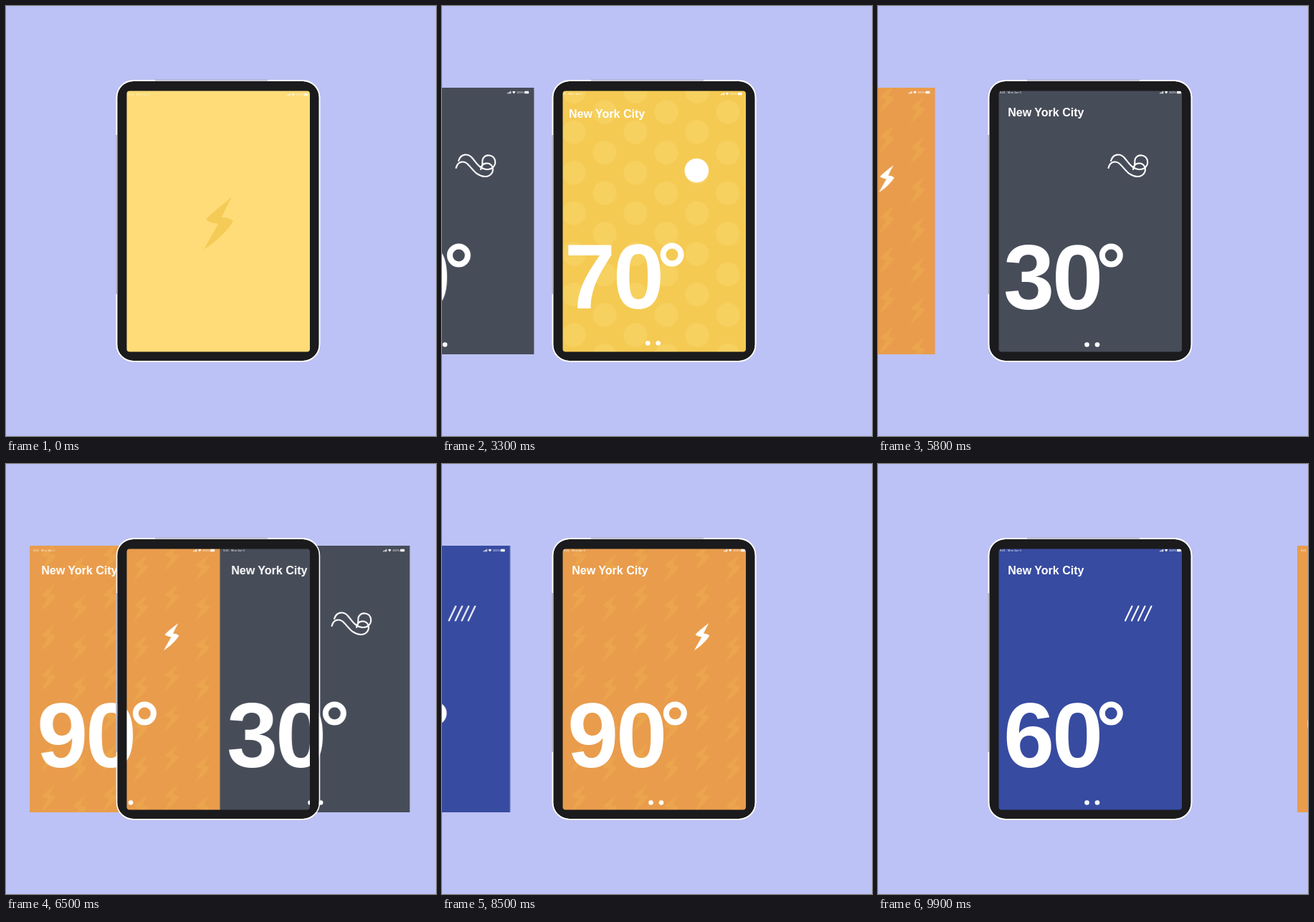
Animation, 600 px wide and 600 px high, one loop 10000 ms. Source, as an HTML page:

```html
<!DOCTYPE html>
<html lang="en">
<head>
<meta charset="utf-8">
<title>Weather tablet</title>
<style>
html, body { margin: 0; width: 100%; height: 100%; overflow: hidden; background: #bcc2f5; }
svg { display: block; width: 100vw; height: 100vh; }
text { font-family: "Liberation Sans", Arial, sans-serif; fill: #fff; }
.title { font-size: 16px; font-weight: 700; }
.temp { font-size: 128px; font-weight: 700; letter-spacing: -3.2px; }
.tiny { font-size: 4px; white-space: pre; }
.line { fill: none; stroke: #fff; stroke-width: 2.1; stroke-linecap: round; stroke-linejoin: round; }
.panel { animation: 10s linear infinite; }
#sun { animation-name: sun, appear; }
#wind { animation-name: wind; }
#storm { animation-name: storm; }
#rain { animation-name: rain; }

@keyframes appear {
  0%, 20% { opacity: 0; }
  26%, 100% { opacity: 1; }
}
/* Each panel glides in, rests, is pushed aside, then hurries off stage. */
@keyframes sun {
  0%, 34.19% { transform: translateX(0); }
  42.67% { transform: translateX(267px); }
  46.46%, 100% { transform: translateX(447px); }
}
@keyframes wind {
  0%, 28.59% { transform: translateX(-440px); }
  42.67%, 60.75% { transform: translateX(0); }
  69.23% { transform: translateX(265px); }
  73.02%, 100% { transform: translateX(445px); }
}
@keyframes storm {
  0%, 55.15% { transform: translateX(-440px); }
  69.23%, 87.26% { transform: translateX(0); }
  95.74% { transform: translateX(265px); }
  100% { transform: translateX(467px); }
}
@keyframes rain {
  0%, 81.66% { transform: translateX(-440px); }
  95.74%, 100% { transform: translateX(0); }
}
</style>
</head>
<body>
<svg viewBox="0 0 600 600">
  <defs>
    <path id="bolt" d="M39 0C25 11 10 22 3 31Q8 36 20 37C14 48 7 60 0 73C15 63 32 49 41 33Q35 28 25 28Q30 16 39 0Z"/>
    <g id="icons" fill="#fff">
      <path d="M0 3h1v1H0zM1.4 2.3h1V4h-1zM2.8 1.5h1V4h-1zM4.2.6h1V4h-1z"/>
      <path d="M7 1.6Q9.2-.4 11.4 1.6L9.2 4.2z"/>
      <text class="tiny" x="13" y="4">100%</text>
      <rect x="24" y=".6" width="6" height="3.4" rx=".8"/>
    </g>
    <pattern id="dots" x="162.5" y="100" width="86" height="56.6" patternUnits="userSpaceOnUse">
      <g fill="#f6d160">
        <circle cx="21.5" cy="19.4" r="16.5"/>
        <circle cx="64.5" cy="48" r="16.5"/>
        <circle cx="64.5" cy="-8.6" r="16.5"/>
      </g>
    </pattern>
    <pattern id="bolts" x="169" y="100" width="86" height="56" patternUnits="userSpaceOnUse">
      <g fill="#eba54c">
        <use href="#bolt" transform="translate(11 11) scale(.52)"/>
        <use href="#bolt" transform="translate(54 26) scale(.52)"/>
        <use href="#bolt" transform="translate(54 -30) scale(.52)"/>
      </g>
    </pattern>
  </defs>

  <rect width="600" height="600" fill="#bcc2f5"/>
  <rect x="153.7" y="103.2" width="284.6" height="393.4" rx="24" fill="#fff"/>
  <path d="M208 103.4H365M154 180V402" stroke="#b3b5c6" stroke-width="1.4"/>

  <rect x="165" y="115" width="262" height="371" fill="#ffdc78"/>
  <use href="#bolt" x="276" y="267" fill="#f5cb57"/>
  <g opacity=".75">
    <text class="tiny" x="171" y="125">9:41   Mon Jun 3</text>
    <use href="#icons" x="391.5" y="121.3"/>
  </g>

  <g id="stage"></g>

  <path fill="#1b1b1d" fill-rule="evenodd" d="M178 105H414A22.5 22.5 0 0 1 436.7 127.5V472.500A22.500 22.500 0 0 1 414 495H178A22.500 22.500 0 0 1 155.300 472.500V127.500A22.500 22.500 0 0 1 178 105ZM172.500 118.500A4 4 0 0 0 168.500 122.500V478.500A4 4 0 0 0 172.500 482.500H420A4 4 0 0 0 424 478.500V122.500A4 4 0 0 0 420 118.500Z"/>
  <rect x="154.500" y="104.200" width="283" height="391.500" rx="23.300" fill="none" stroke="#fff" stroke-width="1.500"/>
  <path d="M208 103.700H365M154.200 180V402" stroke="#b3b5c6" stroke-width="1.600"/>
</svg>
<script>
const normal = { x: 165, y: 114, w: 265.3, h: 372, left: 182, title: 154, status: 120.5, base: 423, dots: 472.5 };
const inset = { x: 163, y: 116, w: 267, h: 368, left: 177.7, title: 156, status: 122.5, base: 422, dots: 470.5 };

const slashes = [0, 9, 18, 27].map(d => `M${345 + d} 218.500l9.500-20`).join("");

const panels = [
  { id: "sun", temp: 70, fill: "#f5ca53", pattern: "dots", box: inset,
    icon: '<circle cx="355.300" cy="229.500" r="16.800" fill="#fff"/>' },
  { id: "wind", temp: 30, fill: "#474c59", box: normal,
    icon: `<path class="line" d="M325 216C328 206 338 205 344 212C350 219 354 227 364 228
      C372 228.500 377 223 376 216C374 207 363 206 359 213C357 218 360 222 356 228
      M321.500 226C324 216 333 215 339 222C346 229 350 237 362 238
      C370 238 375 231 372 224C368 217 357 218 356 228"/>` },
  { id: "storm", temp: 90, fill: "#e99c4c", pattern: "bolts", box: normal,
    icon: '<use href="#bolt" transform="translate(352 222) scale(.52)" fill="#fff"/>' },
  { id: "rain", temp: 60, fill: "#374ba1", box: normal,
    icon: `<path class="line" d="${slashes}"/>` }
];

function draw({ id, temp, fill, pattern, box: b, icon }) {
  const area = paint => `<rect x="${b.x}" y="${b.y}" width="${b.w}" height="${b.h}" fill="${paint}"/>`;
  const dot = dx => `<circle cx="${b.left + dx}" cy="${b.dots}" r="3.300" fill="#fff"/>`;
  return `<g class="panel" id="${id}">
    ${area(fill)}${pattern ? area(`url(#${pattern})`) : ""}
    <text class="tiny" x="${b.left - 12}" y="${b.status + 1.5}">9:41   Mon Jun 3</text>
    <use href="#icons" x="${b.left + 211}" y="${b.status - 2.3}"/>
    <text class="title" x="${b.left - 0.7}" y="${b.title}">New York City</text>
    ${icon}
    <text class="temp" x="${b.left - 7}" y="${b.base}">${temp}</text>
    <circle cx="${b.left + 143.3}" cy="${b.base - 75}" r="12.500" fill="none" stroke="#fff" stroke-width="8"/>
    ${dot(109.5)}${dot(124)}
  </g>`;
}

document.getElementById("stage").innerHTML = panels.map(draw).join("");
</script>
</body>
</html>
```
